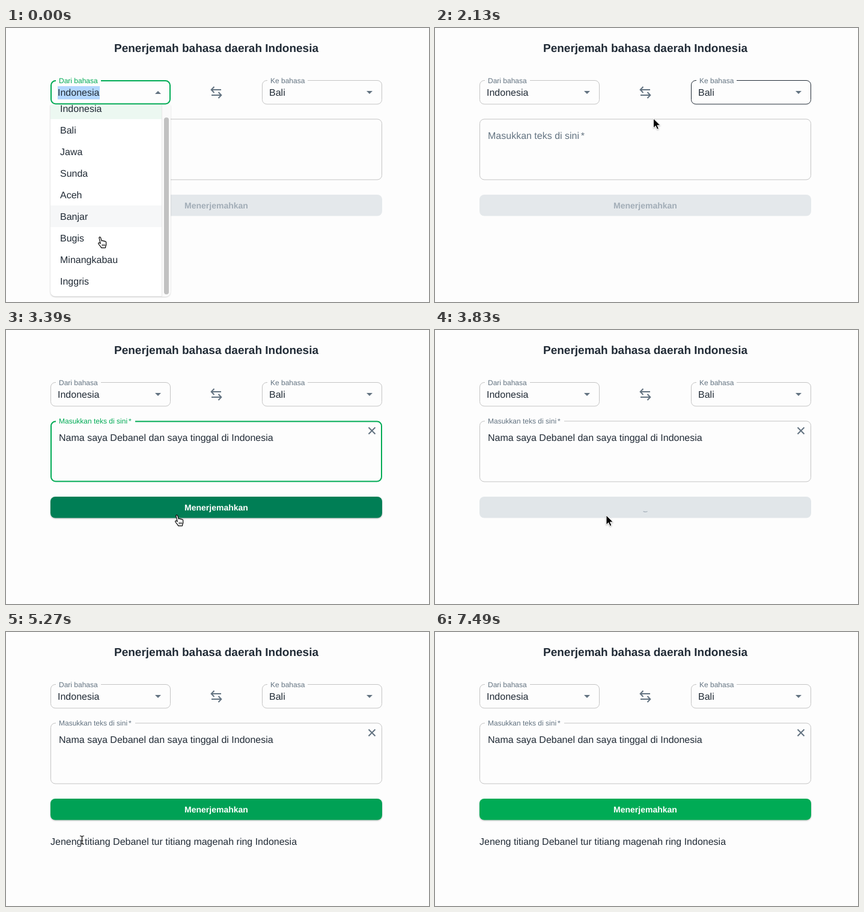
These frames come from a looping animation (704x457 px, 8.03 s). An HTML page:

```html
<!DOCTYPE html>
<html lang="id">
<head>
<meta charset="utf-8">
<title>Penerjemah bahasa daerah</title>
<style>
  html, body { margin: 0; width: 100%; height: 100%; overflow: hidden; background: #fdfdfd; }
  svg { display: block; width: 704px; height: 457px; }
  text { font: 16px "Liberation Sans", Arial, sans-serif; fill: #212b36; text-rendering: geometricPrecision; white-space: pre; }
  .small { font-size: 12px; fill: #637381; }
  .bold { font-weight: bold; text-anchor: middle; }
  .icon { fill: none; stroke: #637381; stroke-width: 2; }
  .box { fill: none; }
  .notch { fill: #fdfdfd; }
  .mark { fill: #b3d7fe; }
</style>
</head>
<body>
<svg viewBox="0 0 704 457">
  <rect width="704" height="457" fill="#fdfdfd"/>
  <text class="bold" x="350" y="39.5" style="font-size:19px">Penerjemah bahasa daerah Indonesia</text>

  <rect class="box" id="fromBox" rx="7.5"/>
  <rect class="notch" x="83" y="86" width="75" height="4"/>
  <text class="small" id="fromLabel" x="88" y="91.5">Dari bahasa</text>
  <rect class="mark" id="fromMark" x="86" y="97" width="70" height="22"/>
  <text x="86" y="113">Indonesia</text>
  <path id="fromArrow" d="M-5 -2.5L0 2.5 5 -2.5z" fill="#637381"/>

  <path class="icon" d="M358 103H342M346.5 98L341.7 103l4.800 5M342 112H358M353.500 107l4.800 5-4.800 5"/>

  <rect class="box" id="toBox" rx="7.5"/>
  <rect class="notch" x="435" y="86" width="67" height="4"/>
  <text class="small" x="440" y="91.5">Ke bahasa</text>
  <text x="438" y="113">Bali</text>
  <path d="M600 105l5 5 5-5z" fill="#637381"/>

  <rect class="box" id="areaBox" rx="7.5"/>
  <rect class="notch" id="areaNotch" x="83" y="150" width="132" height="5"/>
  <g id="areaLabel"><text id="areaText">Masukkan teks di sini<tspan dx="2.7">*</tspan></text></g>
  <g id="typed">
    <text x="88" y="185">Nama saya Debanel dan saya tinggal di Indonesia</text>
    <path class="icon" d="M603.500 162.500l11 11M614.500 162.500l-11 11"/>
  </g>
  <rect id="caret" y="171" width="1" height="18" fill="#212b36"/>

  <rect id="button" x="74" y="278" width="552" height="35.500" rx="8"/>
  <text class="bold" id="buttonText" x="350" y="301" style="font-size:14px">Menerjemahkan</text>
  <circle id="spinner" r="20.2" fill="none" stroke="#a1acb7" stroke-width="3.6"/>

  <rect class="mark" id="resultMark" x="74" y="337" height="25"/>
  <text id="result" x="74" y="355">Jeneng titiang Debanel tur titiang magenah ring Indonesia</text>

  <g id="list">
    <clipPath id="listClip"><path d="M74 128H274V440a8 8 0 0 1 -8 8H82a8 8 0 0 1 -8 -8z"/></clipPath>
    <path d="M74 128H273.500V440a7.500 7.500 0 0 1 -7.500 7.500H82a8 8 0 0 1 -8 -8z" fill="#fff" style="filter:drop-shadow(0 1px 1px rgba(0,0,0,.24))"/>
    <g clip-path="url(#listClip)">
      <g id="rows">
        <rect x="74" y="136" width="185" height="36" fill="#ecf8f1"/>
        <rect id="hover" x="74" width="185" height="36" fill="#f6f7f8"/>
      </g>
      <path d="M259 128h15v320h-15z" fill="#fafafa"/>
      <path d="M259.500 128v320" stroke="#e8e8e8"/>
      <rect id="thumb" x="263" y="130.500" width="8" height="295" rx="4" fill="#c1c1c1"/>
    </g>
  </g>

  <g id="cursor" stroke-linejoin="round">
    <path id="arrow" d="M0 0V15.800l3.700-3.500 2.500 5.800 2.700-1.100-2.500-5.700h5z" fill="#000" stroke="#fff" style="filter:drop-shadow(0 1px 1px rgba(0,0,0,.3))"/>
    <g id="beam" fill="none">
      <path d="M-3.500 -7Q0 -7 0 -5Q0 -7 3.500 -7M0 -5V5M-3.500 7Q0 7 0 5Q0 7 3.500 7M-2 1H2" stroke="#fff" stroke-width="2.6"/>
      <path d="M-3.500 -7Q0 -7 0 -5Q0 -7 3.500 -7M0 -5V5M-3.500 7Q0 7 0 5Q0 7 3.500 7M-2 1H2" stroke="#000" stroke-width="1.2"/>
    </g>
    <g id="hand" stroke="#000">
      <path d="M-2 1.200c-.3-1.800 2-2.200 2.600-.4L2.200 6.200c.6-1 2.200-.9 2.600.3.800-.8 2.200-.5 2.500.6.900-.6 2.200 0 2.300 1.200.3 2.600.5 5-.8 7.200l-.4 2.200H1.800c-1.200-2.600-3-4-4.600-6.200-1.200-1.700.2-3 1.700-2.100L.2 10.600z" fill="#fff" stroke-width="1.200"/>
      <path d="M3.200 11.500v3.500M5.200 11.500v3.500M7.200 11.500v3.500" fill="none" stroke-width=".9"/>
    </g>
  </g>
</svg>
<script>
const $ = id => document.getElementById(id);
const set = (id, attrs) => { for (const k in attrs) $(id).setAttribute(k, attrs[k]); };
const show = (id, on) => set(id, { visibility: on ? 'visible' : 'hidden' });
const clamp = v => Math.min(1, Math.max(0, v));
const mix = (a, b, p) => a + (b - a) * p;

const GREEN = [0, 171, 85], DARK = [0, 123, 85], PALE = [228, 232, 235], GREY = [99, 115, 129];
const LOOP = 8030;
const CLOSE = 1490, FOCUS = 2380, PASTE = 2760, BLUR = 3560, LOAD = 3620, DONE = 4820;

const ticks = [0];
for (let i = 1; i < 90; i++) ticks.push(ticks[i - 1] + ([7, 9, 21, 43, 72, 74, 84].includes(i) ? 80 : 90));

// Pointer path: time, x, y, shape
const path = [
  [0, 157, 349, 'hand'], [710, 157, 349, 'hand'], [880, 200, 285, 'hand'], [970, 250, 228, 'hand'],
  [1060, 322, 176, 'beam'], [1240, 348, 162, 'beam'], [1330, 356, 146, 'arrow'], [1510, 378, 145, 'arrow'],
  [1600, 410, 125, 'arrow'], [1690, 445, 110, 'beam'], [1860, 462, 107, 'beam'], [2040, 462, 107, 'beam'],
  [2130, 363.5, 151, 'arrow'], [2220, 300, 170, 'beam'], [2400, 246, 184, 'beam'], [2940, 246, 184, 'beam'],
  [3210, 276, 285, 'hand'], [3390, 285, 309, 'hand'], [LOAD, 285, 309, 'arrow'], [DONE, 285, 309, 'hand'],
  [4990, 285, 309, 'hand'], [5140, 190, 332, 'beam'], [5270, 126.5, 347, 'beam'], [5500, 80, 354, 'beam'],
  [6200, 80, 354, 'beam'], [6350, 190, 380, 'arrow'], [6520, 385, 408, 'arrow'], [6600, 402.5, 405.5, 'arrow'],
  [7160, 402.5, 405.5, 'arrow'], [7320, 520, 425, 'arrow'], [7410, 645, 448, 'arrow'], [7490, 720, 480, 'arrow']
];

function bezier(x1, y1, x2, y2) {
  const at = (a, b, s) => 3 * a * s * (1 - s) ** 2 + 3 * b * s * s * (1 - s) + s ** 3;
  return x => {
    let lo = 0, hi = 1;
    for (let i = 0; i < 20; i++) {
      const mid = (lo + hi) / 2;
      if (at(x1, x2, mid) < x) lo = mid; else hi = mid;
    }
    return at(y1, y2, lo);
  };
}
const ease = bezier(.4, 0, .2, 1), easeInOut = bezier(.42, 0, .58, 1);

// Colour after a chain of [start, colour] transitions
function colour(chain, t, ms) {
  let i = chain.length - 1;
  while (i > 0 && chain[i][0] > t) i--;
  const [start, to] = chain[i], from = chain[Math.max(0, i - 1)][1];
  const p = ease(clamp((t - start) / ms));
  return `rgb(${to.map((v, k) => Math.round(mix(from[k], v, p)))})`;
}

function pointer(t) {
  let i = path.length - 1;
  while (path[i][0] > t) i--;
  const a = path[i], b = path[i + 1] || a;
  const p = b === a ? 0 : (t - a[0]) / (b[0] - a[0]);
  return { x: mix(a[1], b[1], p), y: mix(a[2], b[2], p), shape: a[3] };
}

function outline(id, x, y, w, h, focus, hover) {
  const line = focus ? 2 : 1;
  set(id, {
    x: x + line / 2, y: y + line / 2, width: w - line, height: h - line,
    stroke: focus ? '#00ab55' : hover ? '#212b36' : '#c4c4c4', 'stroke-width': line
  });
}

function spin(t) {
  const p = (t - LOAD) / 1400 % 1;
  const grow = easeInOut(clamp(p * 2)), slide = p < .5 ? 0 : easeInOut(p * 2 - 1);
  set('spinner', {
    transform: `translate(350 296) scale(${16 / 44}) rotate(${p * 360})`,
    'stroke-dasharray': `${mix(1, 100, grow)} 200`,
    'stroke-dashoffset': -15 * grow - 110 * slide
  });
}

const within = (t, a, b) => t >= a && t < b;

function draw(t) {
  const at = pointer(t);
  const open = t < CLOSE, focus = within(t, FOCUS, BLUR), loading = within(t, LOAD, DONE);

  outline('fromBox', 74, 87, 200, 40.5, open, false);
  outline('toBox', 426, 87, 200, 40.5, false, within(t, 1640, 2200));
  outline('areaBox', 74, 151.5, 552, 102, focus, within(t, 1000, 1300) || within(t, 2200, FOCUS));
  $('fromLabel').style.fill = colour([[0, GREEN], [CLOSE, GREY]], t, 200);
  show('fromMark', open);
  set('fromArrow', { transform: `translate(253 107.5) rotate(${open ? 180 : 0})` });

  // Suggestion list
  show('list', open);
  const scroll = 20 * (1 - clamp((t - 300) / 320));
  const row = t < 450 ? 5 : at.x > 259 ? 2 : Math.floor((at.y + 6 - 136 + scroll) / 36);
  set('rows', { transform: `translate(0 ${-scroll})` });
  set('hover', { y: 136 + 36 * row });
  set('thumb', { y: 130.5 + scroll * 320 / 340 });

  // Text area
  const lift = ease(clamp((t - FOCUS) / 200));
  set('areaLabel', { transform: `translate(88 ${mix(184.5, 155.8, lift)}) scale(${mix(1, .75, lift)})` });
  $('areaText').style.fill = colour([[0, GREY], [FOCUS, GREEN], [BLUR, GREY]], t, 200);
  show('areaNotch', t >= FOCUS);
  show('typed', t >= PASTE);
  const blink = t - (t < PASTE ? FOCUS : PASTE);
  show('caret', focus && blink % 1000 < 500);
  set('caret', { x: t < PASTE ? 88 : 444.5 });

  // Button
  const active = t >= PASTE && !loading;
  $('button').style.fill = colour([[0, PALE], [PASTE, GREEN], [3210, DARK], [LOAD, PALE], [DONE, DARK], [5140, GREEN]], t, 250);
  $('button').style.filter = active ? 'drop-shadow(0 1px 1.2px rgba(0,0,0,.28))' : 'none';
  $('buttonText').style.fill = active ? '#fff' : '#a2adb7';
  show('buttonText', !loading);
  show('spinner', loading);
  if (loading) spin(t);

  show('result', t >= DONE);
  show('resultMark', within(t, 5900, 6960));
  set('resultMark', { width: t < 6080 ? 53 : 410 });

  set('cursor', { transform: `translate(${at.x} ${at.y})` });
  for (const s of ['arrow', 'beam', 'hand']) show(s, s === at.shape && t < 7490);
}

['Indonesia', 'Bali', 'Jawa', 'Sunda', 'Aceh', 'Banjar', 'Bugis', 'Minangkabau', 'Inggris'].forEach((name, i) => {
  const label = document.createElementNS('http://www.w3.org/2000/svg', 'text');
  label.textContent = name;
  label.setAttribute('x', 90);
  label.setAttribute('y', 159.5 + 36 * i);
  $('rows').append(label);
});

const begin = performance.now();
function frame() {
  const t = (performance.now() - begin) % LOOP;
  draw(ticks.findLast(v => v <= t) || 0);
  requestAnimationFrame(frame);
}
frame();
</script>
</body>
</html>
```
